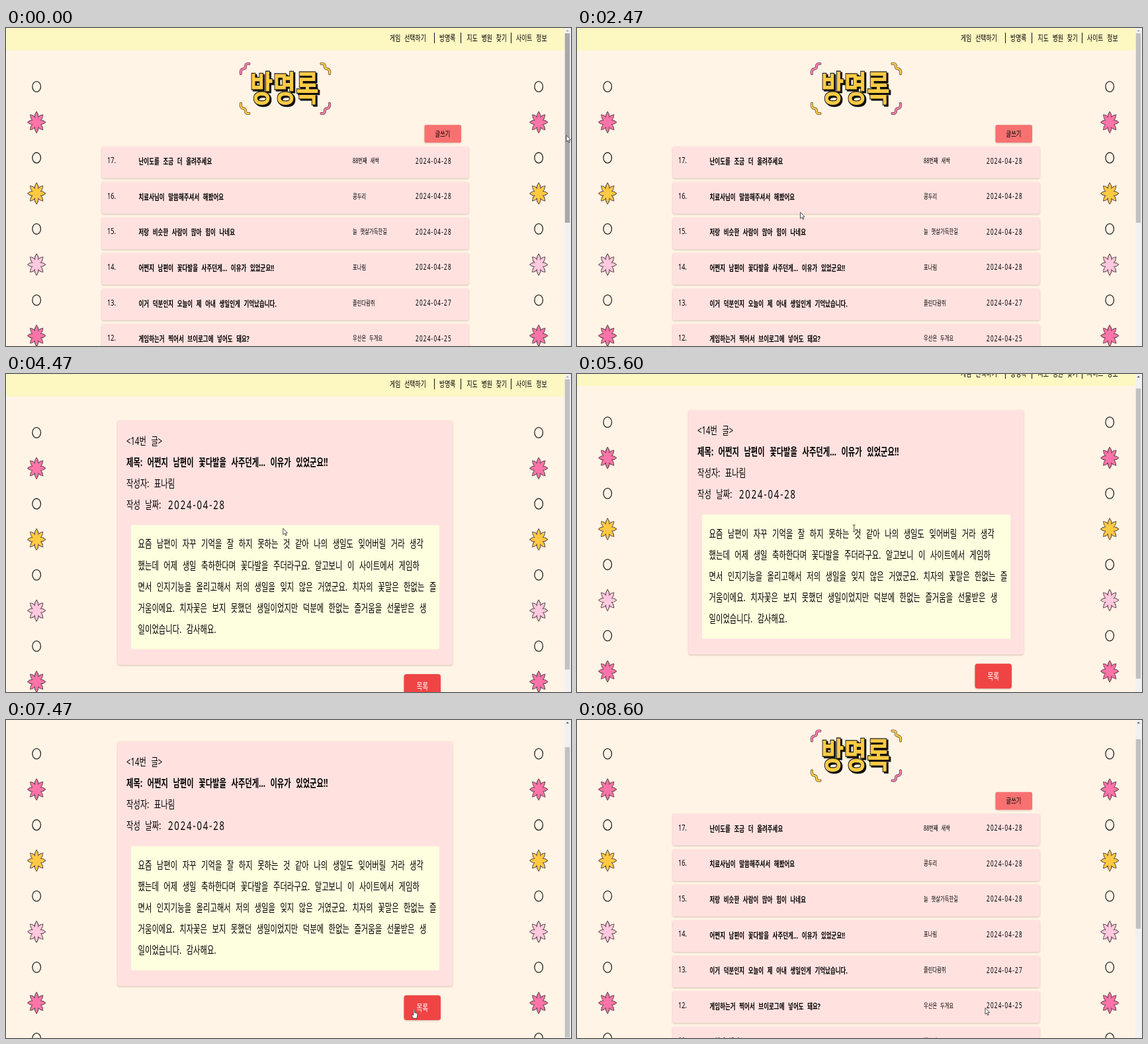
An HTML page that plays this animation: 854 px wide and 480 px high, repeating every 9130 ms.

```html
<!DOCTYPE html>
<html lang="ko">
<head>
<meta charset="utf-8">
<style>
html, body { margin: 0; width: 100%; height: 100%; overflow: hidden; background: #fff4e6; }
svg { display: block; width: 854px; height: 480px; }
text { font-family: "Noto Sans", "Noto Sans CJK KR", sans-serif; word-spacing: .4em; white-space: pre; }
.bold { font-weight: 700; }
.date { letter-spacing: .14em; }
.logo { font-weight: 900; }
.card { filter: drop-shadow(0 1.5px 1.2px rgba(90, 60, 50, .28)); }
.pointer path { fill: #fff; stroke: #222; stroke-width: .8; stroke-linejoin: round; }
</style>
</head>
<body>
<svg id="stage" viewBox="0 0 854 480"></svg>
<script>
const NARROW = 0.71; // one width for all type: the lettering is condensed
const DETAIL_PAGE = 51, EMPTY_LIST = 119, FULL_LIST = 121;

// Text set from x, vertically centred on y
const text = (x, y, size, str, cls = '', attrs = '') =>
  `<text class="${cls}" font-size="${size}" ${attrs} transform="translate(${x} ${y + size * 0.37}) scale(${NARROW} 1)">${str}</text>`;
const rect = (x, y, w, h, fill, r = 0, cls = '') =>
  `<rect class="${cls}" x="${x}" y="${y}" width="${w}" height="${h}" rx="${r}" fill="${fill}"/>`;
const group = (id, body) => `<g id="${id}">${body}</g>`;

function flower(x, y, fill) {
  let d = '';
  for (let i = 0; i < 8; i++) {
    const a = i * Math.PI / 4;
    const at = (r, turn) => `${(r * Math.sin(a + turn) * 0.84).toFixed(2)} ${(-r * Math.cos(a + turn)).toFixed(2)}`;
    d += `M0 0C${at(6, -0.62)} ${at(11.5, -0.33)} ${at(15.2, 0)}C${at(11.5, 0.33)} ${at(6, 0.62)} 0 0Z`;
  }
  return `<path d="${d}" transform="translate(${x} ${y})" fill="${fill}" stroke="#584048" stroke-width="2" paint-order="stroke"/>`;
}

function border() {
  const colors = ['#ff74a8', '#ffca42', '#ffc9de', '#ff74a8'];
  let out = '';
  for (const x of [46.2, 805.2])
    for (let i = 0; i < 5; i++) {
      const y = 88.5 + i * 107.4;
      out += `<ellipse cx="${x}" cy="${y}" rx="6.3" ry="7.9" fill="none" stroke="#262626" stroke-width="1.3"/>`;
      if (colors[i]) out += flower(x, y + 53.8, colors[i]);
    }
  return out;
}

function header() {
  const links = [[580, '게임 선택하기'], [655, '방명록'], [696.5, '지도 병원 찾기'], [771, '사이트 정보']];
  return rect(0, 0, 844, 34, '#fdf7c2') +
    links.map(([x, s]) => text(x, 15, 12.5, s)).join('') +
    [647, 687, 763].map(x => rect(x, 7, 1.1, 16, '#222')).join('');
}

function squiggle(x, y, sx, sy, color) {
  const d = 'M2 17C1 12 3 10 6 9.500C9 9 9 8 9 5.500C9 2.500 11 1.500 14.500 2';
  const line = (c, w) => `<path d="${d}" fill="none" stroke="${c}" stroke-width="${w}" stroke-linecap="round"/>`;
  return `<g transform="translate(${x} ${y}) scale(${sx} ${sy})">${line('#4a3b35', 4)}${line(color, 2.7)}</g>`;
}

function logo() {
  const pink = '#ff7db0', gold = '#ffcb45';
  const word = (dx, color) =>
    text(369 + dx, 91 + dx, 53, '방명록', 'logo', `fill="${color}" stroke="#111" stroke-width="2.4" paint-order="stroke"`);
  return squiggle(353, 52, 1, 1, pink) + squiggle(491, 52, -1, 1, gold) +
    squiggle(353, 131, 1, -1, gold) + squiggle(491, 131, -1, -1, pink) +
    word(2.2, '#111') + word(0, gold) +
    rect(632.5, 146.300, 55.5, 26.700, '#f87171', 2.5, 'card') + text(648.5, 159.500, 11.7, '글쓰기');
}

const posts = [
  ['난이도를 조금 더 올려주세요', '88번째 새싹', '28'],
  ['치료사님이 말씀해주셔서 해봤어요', '콩두리', '28'],
  ['저랑 비슷한 사람이 많아 힘이 나네요', '늘 햇살가득한길', '28'],
  ['어쩐지 남편이 꽃다발을 사주던게... 이유가 있었군요!!', '표나림', '28'],
  ['이거 덕분인지 오늘이 제 아내 생일인게 기억났습니다.', '졸린다람쥐', '27'],
  ['게임하는거 찍어서 브이로그에 넣어도 돼요?', '우산은 두개요', '25'],
  ['그림이 예뻐요', '별보리', '25'],
];

const list = () => posts.map(([title, writer, day], i) => {
  const y = 178.800 + i * 53.6;
  return rect(144.5, y, 555, 48, '#ffe2e0', 3, 'card') +
    text(153, y + 20.5, 13, `${17 - i}.`) +
    text(200.5, y + 23, 12, title, 'bold') +
    text(524, y + 21.5, 10.3, writer) +
    text(619, y + 21.5, 11.7, `2024-04-${day}`, 'date');
}).join('');

function detail() {
  const [title, writer, day] = posts[3];
  const body = [
    '요즘 남편이 자꾸 기억을 잘 하지 못하는 것 같아 나의 생일도 잊어버릴 거라 생각',
    '했는데 어제 생일 축하한다며 꽃다발을 주더라구요. 알고보니 이 사이트에서 게임하',
    '면서 인지기능을 올리고해서 저의 생일을 잊지 않은 거였군요. 치자의 꽃말은 한없는 즐',
    '거움이에요. 치자꽃은 보지 못했던 생일이었지만 덕분에 한없는 즐거움을 선물받은 생',
    '일이었습니다. 감사해요.',
  ];
  return rect(168.5, 70, 506.5, 369.300, '#ffe2e0', 3, 'card') +
    text(182, 101, 16, '&lt;14번 글&gt;') +
    text(182, 133, 16, `제목: ${title}`, 'bold') +
    text(182, 165, 16, `작성자: ${writer}`) +
    text(182, 197, 16, '작성 날짜:') + text(245, 197, 18.5, `2024-04-${day}`, 'date') +
    rect(189, 228, 466, 187.300, '#feffdf', 2.5) +
    body.map((s, i) => text(199.5, 256.5 + i * 32.1, 16, s)).join('') +
    rect(601.5, 453, 55.5, 37.5, '#ef4444', 4, 'card') +
    text(620.5, 471.5, 13.5, '목록', '', 'fill="#fff"');
}

const cursors = {
  arrow: '<path d="M0 0V9.500L2.200 7.600 3.800 11 5.300 10.300 3.800 7H6.600Z"/>',
  hand: '<path d="M-1.300 2.500Q-.4 .6 .6 2.500V6.500L4 7.500Q5.200 8 5 10L4 15.500H-1L-4 11Q-4.300 9.500-2.800 9.800L-1.300 11Z"/>',
  beam: '<path style="fill:none" d="M-2-5H2M0-5V5M-2 5H2"/>',
};

const stage = document.getElementById('stage');
stage.innerHTML = rect(0, 0, 854, 480, '#fff4e6') +
  group('page', header() + border() + group('top', logo()) + group('list', list()) + group('detail', detail())) +
  rect(844, 0, 10, 480, '#f1f1f1') +
  '<path id="up" d="M846.500 5.200L848.700 2.800 850.900 5.200Z"/>' +
  '<rect id="thumb" x="844.800" width="7.400"/>' +
  `<g id="pointer" class="pointer">${Object.keys(cursors).map(k => group(k, cursors[k])).join('')}</g>`;

const el = id => document.getElementById(id);
const show = (id, on) => el(id).setAttribute('display', on ? 'inline' : 'none');

// Keys are [tick, ...values] at 15 ticks a second
const scrollKeys = [[0, 0], [81, 0], [84, 15.7], [86, 25], [88, 25], [90, 31.6], [92, 37.5], [137, 37.5]];
const pointerKeys = [
  [0, 847, 162], [10, 847, 162], [17, 554, 252], [23, 554, 252], [31, 352, 267], [36, 352, 267],
  [37, 337.500, 278], [50, 300, 353], [62, 300, 353], [67, 418.800, 233], [98, 418.800, 233],
  [107, 629, 437], [112, 617, 435], [137, 617, 434.500],
];

function sample(keys, n) {
  const i = Math.max(1, keys.findIndex(k => k[0] >= n));
  const [a, b] = [keys[i - 1], keys[i]];
  const u = (n - a[0]) / (b[0] - a[0]);
  const e = u * u * (3 - 2 * u);
  return a.slice(1).map((v, j) => v + (b[j + 1] - v) * e);
}

const within = (n, from, to) => n >= from && n < to;

function draw(now) {
  const n = Math.floor((now % 9130 + 4) * 15 / 1000);
  const [scroll] = sample(scrollKeys, n);
  const [x, y] = sample(pointerKeys, n);

  show('detail', within(n, DETAIL_PAGE, EMPTY_LIST));
  show('top', !within(n, DETAIL_PAGE, EMPTY_LIST));
  show('list', !within(n, DETAIL_PAGE, FULL_LIST));
  el('page').setAttribute('transform', `translate(0 ${-scroll})`);

  const short = within(n, DETAIL_PAGE, FULL_LIST);
  const thumb = el('thumb');
  thumb.setAttribute('y', 8 + scroll * (short ? 0.88 : 0.56));
  thumb.setAttribute('height', short ? 438 : 286);
  thumb.setAttribute('fill', n < 11 ? '#a8a8a8' : '#c1c1c1');
  el('up').setAttribute('fill', scroll ? '#505050' : '#a3a3a3');

  const shape = within(n, 48, 58) || within(n, 105, 129) ? 'hand' : within(n, 83, 104) ? 'beam' : 'arrow';
  for (const k in cursors) show(k, k === shape);
  el('pointer').setAttribute('transform', `translate(${x} ${y})`);
}

const start = performance.now();
function loop() {
  draw(performance.now() - start);
  requestAnimationFrame(loop);
}
loop();
</script>
</body>
</html>
```
